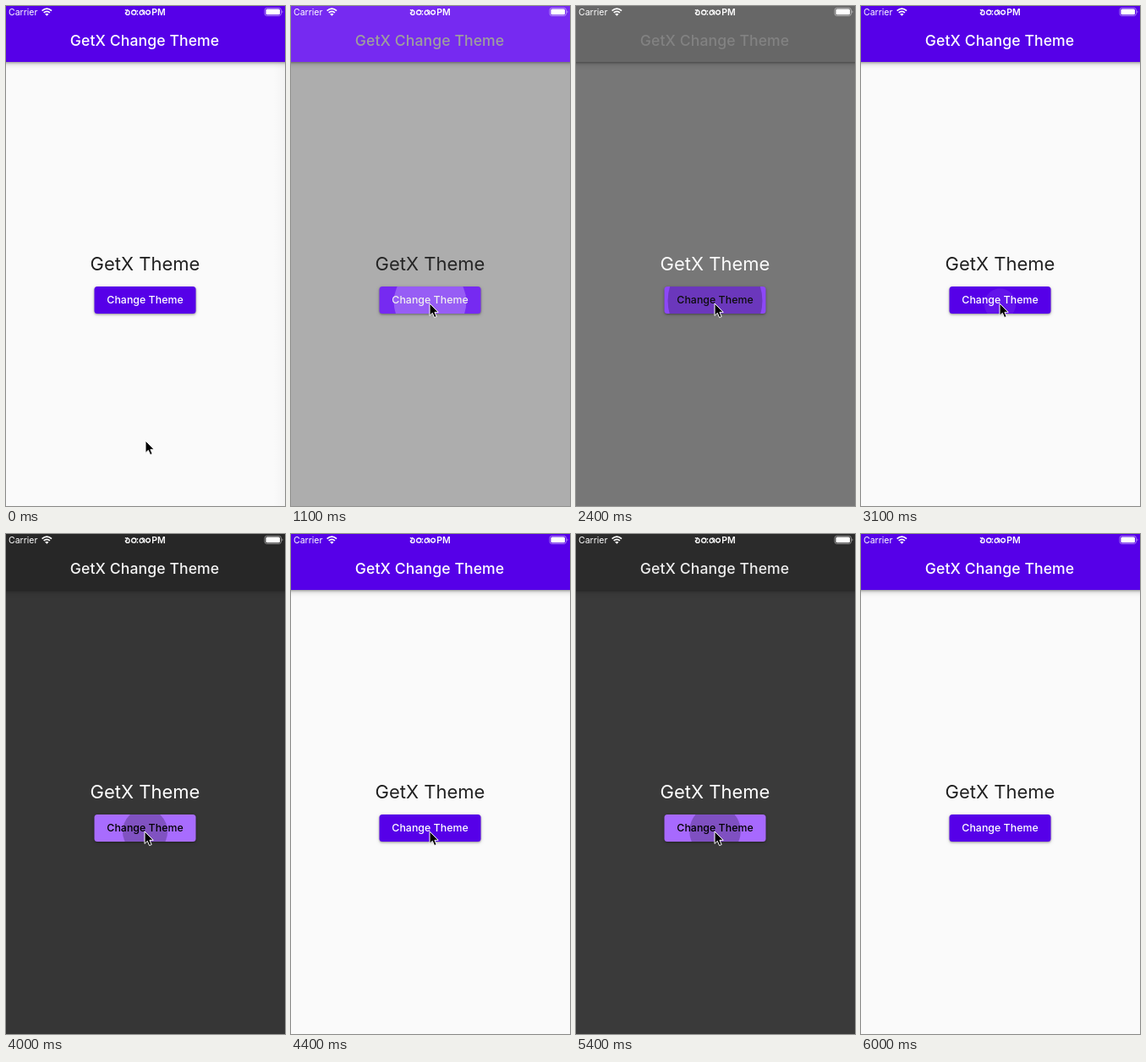
Recreate the animation shown at these times as an HTML page. Size 330 px wide and 590 px high, loop 6.8 s.

```html
<!DOCTYPE html>
<html lang="en">
<head>
<meta charset="utf-8">
<title>Theme switch</title>
<style>
  html, body { margin: 0; width: 100%; height: 100%; overflow: hidden; }
  svg { display: block; width: 330px; height: 590px; }
  text { font-family: Inter, Roboto, sans-serif; }
  .mid { text-anchor: middle; }
  .status { fill: #fff; font-size: 10.5px; }
  .line { fill: none; stroke: #fff; stroke-width: 1.3; }
  #bar { filter: drop-shadow(0 1px 1.5px rgba(0,0,0,.32)) drop-shadow(0 2px 3px rgba(0,0,0,.18)); }
  #button { filter: drop-shadow(0 1px 1px rgba(0,0,0,.3)) drop-shadow(0 1px 2px rgba(0,0,0,.16)); }
</style>
</head>
<body>
<svg viewBox="0 0 330 590">
  <defs>
    <clipPath id="clip"><rect x="104.5" y="331" width="120" height="32" rx="3.5"/></clipPath>
    <linearGradient id="fade"><stop stop-opacity="0"/><stop offset="1" stop-opacity=".025"/></linearGradient>
  </defs>
  <rect id="page" width="330" height="590"/>
  <rect id="edge" x="316" y="66" width="14" height="524" fill="url(#fade)"/>
  <rect id="bar" x="-10" y="-10" width="350" height="76"/>

  <g class="status">
    <text x="3" y="11">Carrier</text>
    <g class="line" stroke-width="1.8">
      <path d="M42.6 5.6Q48.3 .6 54 5.6M44.7 7.9Q48.3 4.8 51.9 7.9" style="stroke-width:1.8"/>
    </g>
    <path d="M46.1 9.5Q48.3 7.8 50.5 9.5L48.3 11.8Z"/>
    <g class="line">
      <path d="M140.8 4.6Q143.4 5 143 7Q142.4 8.6 141.2 7.6M141.2 7.6Q141.6 10.4 144.2 10.4Q146.6 10 146 7Q145.4 5.2 143 4.4"/>
      <circle cx="151.2" cy="7.6" r="2.6"/>
      <path d="M160.4 4.8Q157.6 6.4 158.2 9Q159.2 11 161.2 9.8L163.6 8.2V10.6M163.6 8.4Q164.4 5 161.6 4.8Q160 6.2 163.4 8"/>
      <circle cx="168" cy="7.6" r="2.4"/>
    </g>
    <circle cx="155.4" cy="5.8" r=".85"/><circle cx="155.4" cy="9.8" r=".85"/>
    <text x="172.3" y="11" font-weight="600">PM</text>
    <rect x="306" y="2.3" width="19.4" height="9.2" rx="2.6" fill="none" stroke="#fff" stroke-opacity=".5" stroke-width=".9"/>
    <rect x="307.4" y="3.6" width="16.6" height="6.6" rx="1.5"/>
    <path d="M326.5 5.3Q328.4 6.9 326.5 8.5Z" opacity=".6"/>
  </g>

  <text id="title" class="mid" x="164" y="47" font-size="17.6" font-weight="500" letter-spacing=".1">GetX Change Theme</text>
  <text id="label" class="mid" x="164.5" y="311.5" font-size="22">GetX Theme</text>
  <rect id="button" x="104.5" y="331" width="120" height="32" rx="3.5"/>
  <g id="ripples" clip-path="url(#clip)"></g>
  <text id="caption" class="mid" x="164.5" y="351.3" font-size="12.3" font-weight="500" letter-spacing=".05">Change Theme</text>
  <path id="cursor" d="M0 0V14.4L3.3 11.3L5.6 16.6L8.2 15.5L5.9 10.3H10.2Z" stroke="#fff" stroke-width="1" stroke-linejoin="round"/>
</svg>
<script>
const LOOP = 6800, STEP = 100, LAST = 6000, FADE = 200;

// press, release and start of the theme change, in ms
const taps = [
  [930, 1030, 1024],
  [2200, 2267, 2330],
  [3075, 3190, 3200],
  [3900, 3980, 3994],
  [4480, 4560, 4640],
  [5270, 5370, 5390]
];
// time, x, y of the pointer tip
const path = [
  [0, 165, 513], [700, 164, 351], [5500, 164, 351], [5700, 168, 600], [LOOP, 168, 600]
];
const purple = [86, 0, 232], lilac = [171, 111, 255];

const $ = id => document.getElementById(id);
const clamp = v => Math.min(1, Math.max(0, v));
const mix = (a, b, p) => a + (b - a) * p;
const rgb = c => `rgb(${c.map(Math.round)})`;
const grey = v => rgb([v, v, v]);
const paint = (id, color) => $(id).setAttribute("fill", color);

const ripples = taps.map((tap, i) => {
  const dot = document.createElementNS("http://www.w3.org/2000/svg", "circle");
  dot.setAttribute("fill", i % 2 ? "#000" : "#fff");
  return $("ripples").appendChild(dot);
});

function drawTheme(t) {
  const i = taps.filter(tap => tap[2] <= t).length - 1;
  const age = i < 0 ? 2 * FADE : t - taps[i][2];
  const toDark = i >= 0 && i % 2 === 0;
  const p = clamp(age / FADE);
  const dark = v => toDark ? v : 1 - v;
  // text styles trail behind the theme itself
  const late = c => dark(p < 1 ? c * p * p : mix(c, 1, clamp(age / FADE - 1)));

  const d = dark(p);
  const primary = rgb(purple.map((v, n) => mix(v, lilac[n], d)));
  paint("page", grey(mix(250, 48, d)));
  paint("button", primary);
  paint("bar", d < .5 ? primary : grey(mix(33, 233, 1 - d)));
  paint("title", grey(d < .5 ? 255 * (1 - d) : 255 * (1 - 1.4 * (1 - d))));
  paint("label", grey(mix(33, 255, late(.14))));
  paint("caption", grey(mix(255, 0, late(.42))));
}

function drawRipples(t) {
  taps.forEach(([press, release], i) => {
    const p = 1 - (1 - clamp((t - release) / 225)) ** 2.2;
    const alpha = .24 * clamp((t - press) / 75) * (1 - clamp((t - release - 225) / 150));
    const dot = ripples[i];
    dot.setAttribute("cx", 164.5);
    dot.setAttribute("cy", mix(352, 347, p));
    dot.setAttribute("r", mix(18.6, 62, p));
    dot.setAttribute("opacity", alpha);
  });
}

function drawCursor(t) {
  const n = path.findIndex(key => key[0] > t);
  const [a, b] = [path[n - 1], path[n]];
  const p = clamp((t - a[0]) / (b[0] - a[0]));
  const e = p * p * (3 - 2 * p);
  $("cursor").setAttribute("transform", `translate(${mix(a[1], b[1], e)} ${mix(a[2], b[2], e)})`);
}

function draw(now) {
  const t = Math.min(LAST, Math.floor(now % LOOP / STEP) * STEP);
  drawTheme(t);
  drawRipples(t);
  drawCursor(t);
  $("edge").setAttribute("opacity", t < 800 ? 1 : 0);
}

const start = performance.now();
(function tick() {
  draw(performance.now() - start);
  requestAnimationFrame(tick);
})();
</script>
</body>
</html>
```
